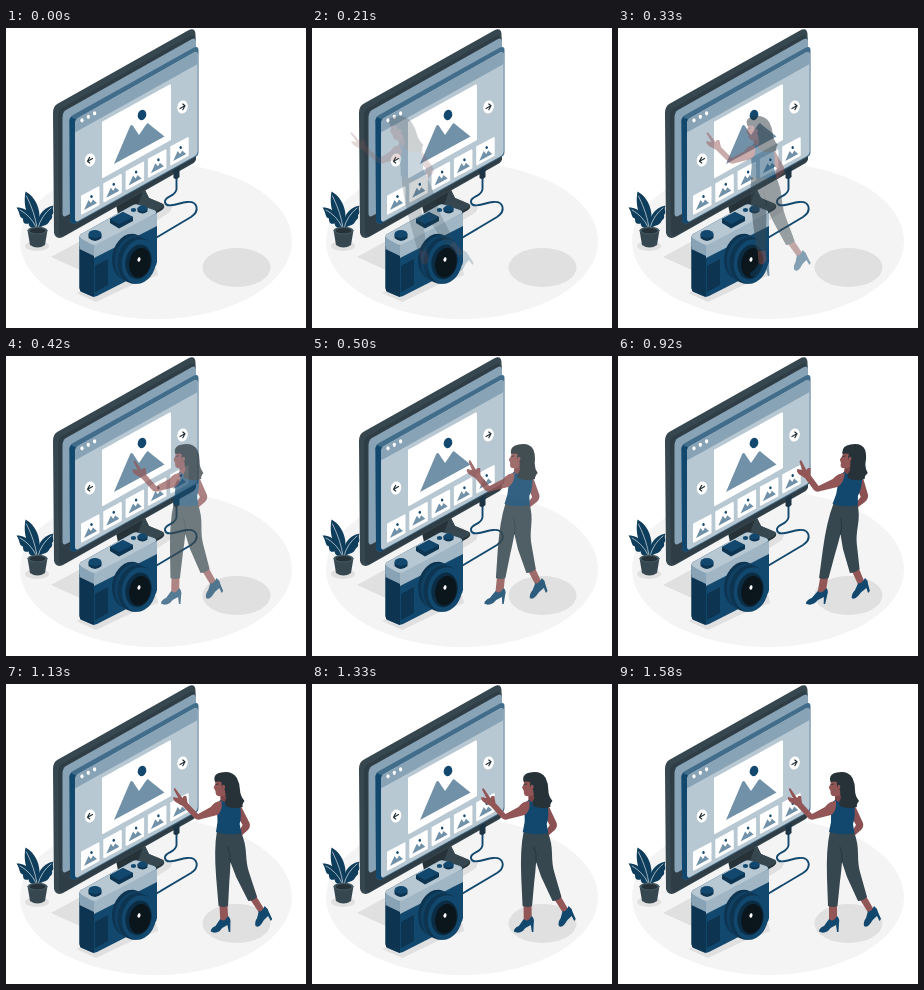
Recreate the animation shown at these times as an HTML page. Size 300 by 300 pixels, loop 1.62 s.

```html
<!DOCTYPE html>
<html lang="en">
<head>
<meta charset="utf-8">
<title>Photo gallery</title>
<style>
html, body { margin: 0; width: 100%; height: 100%; overflow: hidden; background: #fff; }
svg { display: block; width: 100%; height: 100%; }
</style>
</head>
<body>
<svg viewBox="0 0 300 300" stroke-linejoin="round" stroke-linecap="round">
  <g id="floor">
    <ellipse cx="150" cy="213" rx="136" ry="78" fill="#f4f4f4"/>
    <ellipse cx="230.500" cy="239.500" rx="34" ry="19.500" fill="#e0e0e0"/>
    <path d="M45 229L78 211 112 190 150 172 166 179 164 184 120 212 76 243Z" fill="#e0e0e0"/>
    <path d="M70 265L90 274 128 256 152 247 150 238 90 258Z" fill="#e0e0e0"/>
    <ellipse cx="31" cy="218" rx="12" ry="5" fill="#e0e0e0"/>
  </g>

  <g id="plant">
    <g fill="#0f3d5c">
      <path d="M31 201C25 193 16 183 19.500 163.500C30 169 37 184 32 201Z"/>
      <path d="M30 201C25 200 22 198 23 195.500C17 197 17 193 17 190.500C13 190 14 184 10.500 179.500C21 179 31 189 31 201Z"/>
      <path d="M31 201C31 190 35 180 47.500 177.500C45.500 182 49 184 46 187C47 191 44.500 191 43 194C41 198 36 197 32 201Z"/>
    </g>
    <path d="M20.500 168Q29 185 31 200M14 182Q25 188 30 199M45 180Q35 188 32 200" fill="none" stroke="#dce5eb" stroke-width=".7"/>
    <path d="M21.500 202L24 217Q31.500 222 39 217L41.500 202Z" fill="#37474f"/>
    <ellipse cx="31.500" cy="202.500" rx="10" ry="4" fill="#455a64"/>
    <ellipse cx="31.500" cy="202.700" rx="8" ry="2.800" fill="#263238"/>
  </g>

  <g id="monitor">
    <path d="M110 177L138 160 143 170 157 176Q160 179 156 182L144 189 112 186Z" fill="#263238"/>
    <path d="M138 160L143 170 157 176Q159 178 156 180L143 187 131 180Z" fill="#37474f"/>
    <path d="M47 85Q47 78 52 75.500L182 2.500Q189 -1 189.500 6L190 130Q190 134 186 136L57 209Q50 212 48 205Z" fill="#37474f"/>
    <path d="M52 88Q52 82 56 80L184 8Q189.500 6 189.500 11L190 130Q190 133 186 135L59 207Q53 210 53 204Z" fill="#2f3e46"/>
    <path d="M56.500 90Q56.500 84 60 82L186 11Q190 9 190 14V118L60 188Q56.500 189.500 56.500 185Z" fill="#88a3b6"/>
    <path d="M63.500 95Q63 89 67 87L188 19.500Q192.500 17.500 192.500 22V124Q192.500 128 189 129L70 195Q64 197 64 191Z" fill="#416d8b"/>
    <path d="M63.500 95Q63 91 65 89L71 92V194.500L70 195Q64 197 64 191Z" fill="#12486e"/>
    <path d="M69 96Q69 92 72 90L188 24.500Q191.700 23 191.700 27V123Q191.700 126.500 189 128L73 192.500Q69 195 69 191Z" fill="#b8c8d3"/>
    <path d="M69 96Q69 92 72 90L188 24.500Q191.700 23 191.700 27V36L69 104.500Z" fill="#88a3b6"/>
    <g fill="#fff">
      <ellipse cx="76" cy="92.300" rx="1.600" ry="2.100"/>
      <ellipse cx="82.300" cy="88.800" rx="1.600" ry="2.100"/>
      <ellipse cx="88.600" cy="85.300" rx="1.600" ry="2.100"/>
      <path d="M97 94.500L164 57.500V111.500L97 149Z" stroke="#fff" stroke-width="2"/>
      <ellipse cx="84" cy="132" rx="5.200" ry="6.600" transform="rotate(14 84 132)"/>
      <ellipse cx="176.500" cy="79" rx="5.200" ry="6.600" transform="rotate(14 176.500 79)"/>
    </g>
    <path d="M108 136L124 98.500Q125.500 96 127 98L133 107 140.500 96Q142 94.500 143.500 96.500L158.500 108.500Z" fill="#7191a8"/>
    <ellipse cx="136" cy="87" rx="4.200" ry="5.200" fill="#12486e" transform="rotate(18 136 87)"/>
    <path d="M86.500 130.500L81.700 133.300M83.700 129.300L81.500 133.300 83.700 135M174 80.500L178.800 77.700M176.800 76L179 77.700 176.800 81.700" fill="none" stroke="#263238" stroke-width="1.200"/>
    <g id="thumbs"></g>
  </g>

  <g id="cable">
    <path d="M170.500 149V161C170 169 158 168 159 174C160 181 172 175 181 174C192 173 194 183 185 189L148 211" fill="none" stroke="#12486e" stroke-width="1.900"/>
    <path d="M167.500 142L173.500 139V149Q170.500 152.500 167.500 150Z" fill="#1c3444"/>
  </g>

  <g id="camera">
    <path d="M73.500 209Q73.500 206 77 205L127 177Q130 175.500 133 177L148 182Q151 183 151 186V234Q151 237 148 239L91 268Q88 269.500 85 268L76 264Q73.500 263 73.500 260Z" fill="#12486e"/>
    <path d="M73.500 218L88 224V269L76 264Q73.500 263 73.500 260Z" fill="#0d3450"/>
    <path d="M73.500 209L88 216V228L73.500 221Z" fill="#88a3b6"/>
    <path d="M88 216L151 185V198L88 230Z" fill="#a0b6c5"/>
    <path d="M73.500 209Q73.500 206 77 205L127 177Q130 175.500 133 177L148 182Q152 184 149 186L91 216Q88 217.500 85 216L76 211Z" fill="#b8c8d3"/>
    <path d="M89 238L102 231V257L89 264Z" fill="#0d3450"/>
    <path d="M82.500 206V210Q89 216 95.500 210V206Z" fill="#0d3450"/>
    <ellipse cx="89" cy="206" rx="6.500" ry="3.900" fill="#12486e"/>
    <path d="M104 191L117 184 127 189V193L113 200.500 104 195Z" fill="#0d3450"/>
    <path d="M104 191L117 184 127 189 113 196Z" fill="#12486e"/>
    <ellipse cx="127.500" cy="182" rx="2.700" ry="2" fill="#12486e"/>
    <path d="M131.500 180V183.500Q136.500 187.500 141.500 183.500V180Z" fill="#0d3450"/>
    <ellipse cx="136.500" cy="180.500" rx="5" ry="3" fill="#12486e"/>
    <g transform="rotate(12 133 234)">
      <ellipse cx="123" cy="231" rx="17.500" ry="23.500" fill="#0d3450"/>
      <ellipse cx="126.500" cy="232" rx="18" ry="23.500" fill="#104062"/>
      <ellipse cx="130" cy="233" rx="18.500" ry="23.500" fill="#0d3450"/>
      <ellipse cx="133" cy="233.500" rx="17" ry="22.500" fill="#12486e"/>
      <ellipse cx="132.500" cy="234" rx="13" ry="17.500" fill="#0c2c43"/>
      <ellipse cx="134" cy="234.500" rx="10.500" ry="15" fill="#0a151c"/>
    </g>
    <ellipse cx="133" cy="231.500" rx="1.500" ry="2.300" fill="#fff" transform="rotate(12 133 231.500)"/>
  </g>

  <g id="woman">
    <path d="M233 122Q238 122 239 126L245 139Q246 143 243 146L236 152 233 149 238 141 233 132Z" fill="#8a5052"/>
    <g fill="#925656">
      <path d="M241 214L248 212 256 226 251 230Z"/>
      <path d="M211 218L219 218 219 236 211 238Z"/>
    </g>
    <g fill="#12486e">
      <path d="M256 222Q259 224 260 228L263 235 261.500 237 259 232Q255 235 252 240Q249 244 246 242Q245 238 248 234L250 227Q253 229 256 222Z"/>
      <path d="M219 232Q222 235 221 239L220.500 248H219L218 241Q213 243 210 247Q205 250 201 247.500Q201 244 206 242L211 235Q215 239 219 232Z"/>
    </g>
    <path d="M212 147L236 148Q240 158 240 170Q240 181 242 188L249 213Q245 217 240 217L229 193 224 178Q223 190 222 197L219.500 222Q215 224 210 222L209 194Q208 165 212 147Z" fill="#37474f"/>
    <path d="M224 178Q225 170 222 163" fill="none" stroke="#263238" stroke-width=".8"/>
    <path d="M217 105L227 104 229 120 217 121Z" fill="#7c4648"/>
    <path d="M217 116Q225 121 231 116L236 119Q238 132 235 140L236.500 149Q224 152 211 148L213 138Q213 127 213.500 119Z" fill="#12486e"/>
    <path d="M218 117Q211 117 207 123L194 130 184 119 183 112 180.500 112 179 114 172.500 104.500Q170.500 103.500 171 106L175 114 170 113Q169 115 172 118L179 122 190 134Q193 137 197 135L213 131Q219 127 218 117Z" fill="#925656"/>
    <path d="M214 91L226 91 227 106Q223 113 217 112Q212 113 212.500 107L210.800 103.500 212.500 100Z" fill="#925656"/>
    <path d="M212.500 98Q210 90 219 88.500Q230 86.500 234.500 94Q237 99 237 106Q237 112 241 117Q238 120 239 123Q230 126 222 122Q220 119 223 114Q222 110 222 106Q218 104 219 98Q216 97 212.500 98Z" fill="#263238"/>
    <ellipse cx="220.800" cy="103" rx="1.500" ry="2.300" fill="#925656"/>
    <path d="M213.500 100.500L215.500 100" stroke="#263238" stroke-width=".8"/>
  </g>
</svg>
<script>
const LOOP = 1620, SPAN = 1500, LEAD = 10, SLIDE = 150;
const PIVOT_Y = 169;
const woman = document.getElementById("woman");

function addThumbs() {
  let out = "";
  for (let i = 0; i < 5; i++) {
    const x = 75 + i * 22.3, y = 167.6 - i * 12.3;
    out += `<g transform="translate(${x} ${y})">
      <path d="M.8 .6L17.700 -8.500V9L.8 18.200Z" fill="#fff" stroke="#fff" stroke-width="1.600"/>
      <path d="M3 14.500L7.500 4.500 10 7.500 12 4 16 7.500Z" fill="#7191a8"/>
      <ellipse cx="10.500" cy="1" rx="1.200" ry="1.500" fill="#12486e"/></g>`;
  }
  document.getElementById("thumbs").innerHTML = out;
}

const bezier = (a, b, s) =>
  3 * (1 - s) ** 2 * s * a + 3 * (1 - s) * s * s * b + s ** 3;

// cubic-bezier(.36, -.01, .5, 1.38), overshoots before settling
function ease(x) {
  let lo = 0, hi = 1;
  for (let i = 0; i < 24; i++) {
    const mid = (lo + hi) / 2;
    if (bezier(0.36, 0.5, mid) < x) lo = mid; else hi = mid;
  }
  return bezier(-0.01, 1.38, (lo + hi) / 2);
}

const mix = (a, b, p) => a + (b - a) * p;

function pose(t) {
  const u = Math.min((t + LEAD) / SPAN, 1);
  if (u < 0.6) {
    const p = ease(u / 0.6);
    return { x: mix(-SLIDE, 0, p), skew: mix(20, -10, p), alpha: p };
  }
  if (u < 0.8) return { x: 0, skew: mix(-10, 2, ease((u - 0.6) / 0.2)), alpha: 1 };
  return { x: 0, skew: mix(2, 0, ease((u - 0.8) / 0.2)), alpha: 1 };
}

function draw(t) {
  const { x, skew, alpha } = pose(t);
  woman.setAttribute("transform",
    `translate(${x} ${PIVOT_Y}) skewX(${skew}) translate(0 ${-PIVOT_Y})`);
  woman.setAttribute("opacity", Math.max(0, Math.min(1, alpha)));
}

const start = performance.now();
function tick() {
  draw((performance.now() - start) % LOOP);
  requestAnimationFrame(tick);
}

addThumbs();
draw(0);
requestAnimationFrame(tick);
</script>
</body>
</html>
```
